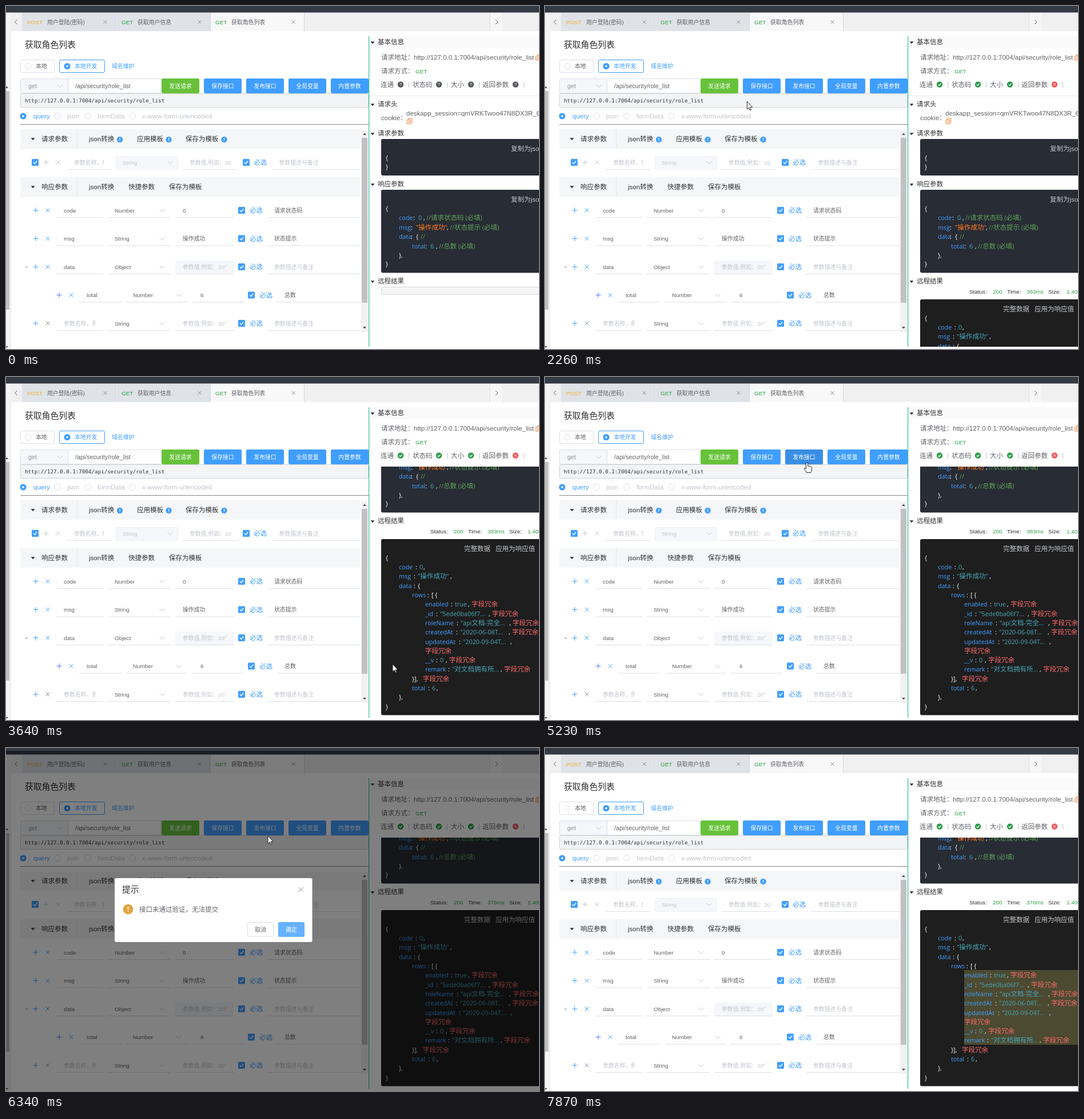
These frames come from a looping animation (932x601 px, 8.05 s). An HTML page:

```html
<!DOCTYPE html>
<html lang="zh-CN">
<head>
<meta charset="utf-8">
<title>接口调试</title>
<style>
html, body { margin: 0; width: 100%; height: 100%; overflow: hidden; background: #fff; }
svg { display: block; }
text { font-family: "Liberation Sans", "Noto Sans CJK SC", "Noto Sans CJK", sans-serif; white-space: pre; }
.code { font-family: "Open Sans", "Noto Sans CJK SC", "Noto Sans CJK", sans-serif; }
.mono { font-family: "DejaVu Sans Mono", monospace; }
.mid { text-anchor: middle; font-weight: 500; }
</style>
</head>
<body>
<svg id="stage" width="932" height="601" viewBox="0 0 932 601"></svg>
<script>
const LOOP = 8050, STEP = 30, S = 9.87, M = 10.7, L = 11.52, H = 14.8;
const BLUE = '#409eff', DARK = '#303133', GREY = '#606266', PALE = '#c0c4cc', EDGE = '#dcdfe6',
      GREEN = '#2c9f45', RED = '#ff6b6b', TEAL = '#46a6b8', NOTE = '#5fa35a', WHITE = '#fff';

// Drawing helpers, each returns markup
const rect = (x, y, w, h, fill, more = '') => `<rect x="${x}" y="${y}" width="${w}" height="${h}" fill="${fill}" ${more}/>`;
const box = (x, y, w, h, fill, stroke, r = 2.5, more = '') =>
  rect(x + .5, y + .5, w - 1, h - 1, fill, `stroke="${stroke}" rx="${r}" ${more}`);
const text = (x, y, s, fill = GREY, size = S, more = '') =>
  `<text x="${x}" y="${y + size * .36}" font-size="${size}" fill="${fill}" ${more}>${s}</text>`;
const line = (d, color, w = 1) => `<path d="${d}" fill="none" stroke="${color}" stroke-width="${w}"/>`;
const shape = (d, fill) => `<path d="${d}" fill="${fill}"/>`;
const disc = (x, y, r, fill, more = '') => `<circle cx="${x}" cy="${y}" r="${r}" fill="${fill}" ${more}/>`;
const rule = (x1, x2, y, color = EDGE) => rect(x1, y, x2 - x1, 1, color);
const cross = (x, y, r, c) => line(`M${x - r} ${y - r}l${2 * r} ${2 * r}m0 ${-2 * r}l${-2 * r} ${2 * r}`, c);
const plus = (x, y, c) => line(`M${x - 4.5} ${y}h9m-4.5 -4.5v9`, c);
const caret = (x, y, r = 3.5, c = DARK) => shape(`M${x - r} ${y - r / 2}h${2 * r}l${-r} ${r + .5}z`, c);
const down = (x, y) => line(`M${x - 4.5} ${y - 2}l4.5 4.5 4.5 -4.5`, PALE);
const clipped = (x, y, w, s) => `<svg x="${x}" y="${y - 10}" width="${w}" height="20">${text(0, 10, s, PALE)}</svg>`;
const group = (id, body, more = '') => `<g id="${id}" ${more}>${body}</g>`;

const radio = (x, y, on) => on
  ? disc(x, y, 5.6, BLUE) + disc(x, y, 1.8, WHITE)
  : disc(x, y, 5.3, WHITE, `stroke="${EDGE}"`);
const check = (x, y) => rect(x - 6, y - 6, 12, 12, BLUE, 'rx="1.5"') + line(`M${x - 3} ${y}l2.3 2.5 4 -5`, WHITE, 1.3);
const info = (x, y) => disc(x, y, 5.2, BLUE) + rect(x - .6, y - 3, 1.2, 3.8, WHITE) + rect(x - .6, y + 1.7, 1.2, 1.3, WHITE);
const copyIcon = (x, y) => line(`M${x - 4.5} ${y - 2}h6.5v7h-6.5zM${x - 2} ${y - 2}v-2.5h6.5v7h-2.5M${x - 3} ${y + .5}h3.5m-3.5 2h3.5`, '#f08a4b');
const button = (x, label, fill, id) =>
  rect(x, 127, 66, 26, fill, `rx="2.5" id="${id}"`) + text(x + 33, 140, label, WHITE, S, `class="mid" id="${id}Label"`);
const section = (y, label) => caret(641, y + 1) + text(650, y, label, DARK, L);
const code = (x, y, s, fill = WHITE) =>
  text(x, y, s.replace(/[\u4e00-\u9fff]+/g, m => `<tspan font-size="${L}">${m}</tspan>`), fill, 10.8, 'class="code"');

function tab(x, verb, color, dx, label, fill) {
  return rect(x, 12, 164, 32, fill) + rect(x + 163, 12, 1, 32, '#d3d7de') + text(x + 8, 28, verb, color) +
    text(x + dx, 28, label) + cross(x + 144.5, 28, 3, '#8a8d93');
}

function head(y, items) {
  return rect(25, y, 595, 34, '#f5f6f7') + rect(124, y, 1, 34, '#e4e7ed') + caret(47, y + 17) +
    items.map(([x, s]) => text(x, y + 17, s, DARK, L)).join('');
}

// One response field; d shifts the row for a nested level
function field(y, name, type, value, note, d = 0) {
  const k = d ? 17 : 0, [nx, tx, vx] = d ? [141, 222, 340] : [101, 190, 309];
  const dim = !name, c = d ? '#5b7cff' : BLUE, u = y + 12;
  return plus(52 + d, y, c) + cross(73 + d, y, 3.3, dim ? '#909399' : BLUE) +
    rule(nx - 13, d ? 202 : 170, u) + rule(tx - 12, d ? 317 : 288, u) +
    (name === 'data' ? rect(296, y - 11, 102, 23, '#f5f7fa') : '') +
    rule(vx - (d ? 15 : 13), d ? 415 : 398, u) + rule(457 + k, 620, u) +
    (dim ? clipped(nx, y, 56, '参数名称，例如') : text(nx, y, name)) +
    text(tx, y, type) + down(d ? 302 : 273, y) +
    (value ? text(vx, y, value) : clipped(vx, y, 77, '参数值,例如：20个')) +
    check(412 + k, y) + text(426 + k, y, '必选', BLUE, L) +
    text((d ? 487 : 469), y, note || '参数描述与备注', note ? GREY : PALE);
}

function leftPane() {
  let s = rect(0, 0, 932, 601, WHITE) + rect(0, 0, 932, 11.5, '#353b45') + rect(0, 12, 8, 589, '#f4f4f5') +
    rect(0, 149, 6, 383, '#c1c1c1') + shape('M0 144h4l-3 -4zM0 596h4l-3 3z', '#505050') + rect(8, 44, 1, 557, '#e8e8ea');
  s += rect(8, 12, 924, 32, '#f0f0f1') + rect(28, 12, 1, 32, '#dfe2e7') +
    line('M19.5 24l-4 4 4 4', GREY) + rect(847, 12, 21, 32, '#f6f6f7') + rect(846, 12, 1, 32, EDGE) + line('M856 24l4 4 -4 4', GREY);
  s += tab(29, 'POST', '#efb02c', 43, '用户登陆(密码)', '#dfe2e7') +
    tab(194, 'GET', GREEN, 36, '获取用户信息', '#dfe2e7') + tab(358, 'GET', GREEN, 36, '获取角色列表', '#f8f8f9');
  s += text(33, 68, '获取角色列表', DARK, H) + box(25, 94, 60, 23, WHITE, EDGE) + box(93, 94, 80, 23, WHITE, BLUE) +
    radio(39, 105.5) + radio(107, 105.5, 1) + text(52, 105.5, '本地') + text(120, 105.5, '本地开发', BLUE) +
    text(185, 105, '域名维护', BLUE);
  s += box(25, 153, 609, 25, '#f3f4f5', '#cfd1d4') +
    text(33, 165.5, 'http://127.0.0.1:7004/api/security/role_list', '#333', 9.22, 'class="mono"');
  s += box(25, 127, 84, 26, '#f5f7fa', EDGE) + text(39, 140, 'get', '#909399', M) + down(94, 140) +
    box(108, 127, 163, 26, WHITE, EDGE, 0) + text(121, 140, '/api/security/role_list', GREY, M);
  s += button(272, '发送请求', '#67c23a', 'send') + button(346, '保存接口', BLUE, 'save') +
    button(420, '发布接口', BLUE, 'publish') + button(494, '全局变量', BLUE, 'vars') + button(568, '内置参数', BLUE, 'preset');
  [[30, 48, 'query'], [90, 107, 'json'], [143, 160, 'formData'], [221, 238, 'x-www-form-urlencoded']]
    .forEach(([cx, tx, label], i) => s += radio(cx, 193, !i) + text(tx, 193, label, i ? PALE : BLUE, L));
  s += rule(25, 634, 207, '#85888e');
  s += head(216, [[62, '请求参数'], [145, 'json转换'], [229, '应用模板'], [314, '保存为模板']]) +
    info(199, 234) + info(284.5, 234) + info(381.5, 234);
  s += check(51, 274) + plus(70, 274, PALE) + cross(91, 274, 3.5, PALE) + rule(106, 184, 286) + clipped(119, 274, 52, '参数名称，例如') +
    box(192, 263, 109, 24, '#f5f7fa', '#edf0f4') + text(204, 274, 'String', PALE) + down(287, 274) +
    rule(309, 405, 286) + clipped(321, 274, 73, '参数值,例如：20') + check(420, 274) + text(433, 274, '必选', BLUE, L) +
    rule(465, 620, 286) + text(477.5, 274, '参数描述与备注', PALE);
  s += head(300, [[62, '响应参数'], [145, 'json转换'], [214, '快捷参数'], [285, '保存为模板']]);
  s += field(358, 'code', 'Number', '0', '请求状态码') + field(407.5, 'msg', 'String', '操作成功', '状态提示') +
    caret(36, 458, 3, PALE) + field(457, 'data', 'Object') + field(506.5, 'total', 'Number', '6', '总数', 41) + field(556, '', 'String');
  return s + rect(621, 218, 12, 353, '#f1f1f1') + rect(622, 231, 10, 289, '#c1c1c1') +
    shape('M624 226h6l-3 -3.5zM624 562h6l-3 3.5z', '#505050') + rect(634, 53, 1.2, 544, '#2fbf97');
}

const checks = [690, 757, 813, 891];
function rightHead() {
  return rect(636, 45, 296, 112, WHITE) + rect(636, 53, 296, 21, '#fafafb') + section(63, '基本信息') +
    text(656, 90, '请求地址：', GREY, L) + text(713, 90, 'http://127.0.0.1:7004/api/security/role_list', GREY, L) + copyIcon(931, 90) +
    text(656, 114, '请求方式：', GREY, L) + text(716, 114, 'GET', GREEN) +
    [[655, '连通'], [711, '状态码'], [778, '大小'], [833, '返回参数']].map(([x, s]) => text(x, 138, s, GREY, L)).join('') +
    [704, 771, 827, 905].map(x => rect(x, 133, 1, 10, '#c4c6ca')).join('') +
    group('asked', checks.map(x => disc(x, 137.5, 5.2, '#55585e') + text(x, 137.5, '?', WHITE, 8, 'class="mid"')).join('')) +
    group('judged', checks.map((x, i) => disc(x, 137.5, 5.2, i < 3 ? '#2a9d48' : '#f05c5c') +
      (i < 3 ? line(`M${x - 2.5} 137.5l2 2 3 -3.5`, WHITE, 1.2) : cross(x, 137.5, 1.8, WHITE))).join(''));
}

function sample() {
  const rows = [[371, 687, 'code', 721, '0', TEAL, 735, '//请求状态码 (必填)'],
    [388, 687, 'msg', 717, '"操作成功"', '#ff7a22', 776, '//状态提示 (必填)'],
    [404.5, 687, 'data', 717, '{', WHITE, 725, '//'], [421, 710, 'total', 742, '6', TEAL, 757, '//总数 (必填)']];
  return rows.map(([y, x, key, vx, v, c, nx, note]) => code(x, y, key, BLUE) + code(vx - 9, y, ':') + code(vx, y, v, c) +
    (v === '{' ? '' : code(nx - 5, y, ',')) + code(nx, y, note, NOTE)).join('') +
    code(664, 355, '{') + code(687, 437, '},') + code(664, 452, '}');
}

function result() {
  const at = i => 547 + 16.3 * i;
  const rows = [[1, 687, 'code', 723, '0', 736], [2, 687, 'msg', 720, '"操作成功"', 783], [3, 687, 'data', 720, '{'], [4, 710, 'rows', 744, '[ {'],
    [5, 733, 'enabled', 785, 'true', 814, 1], [6, 733, '_id', 759, '"5ede0ba06f7...', 850, 1],
    [7, 733, 'roleName', 795, '"api文档-完全...', 886, 1], [8, 733, 'createdAt', 794, '"2020-06-08T...', 885, 1],
    [9, 733, 'updatedAt', 799, '"2020-09-04T...', 888], [11, 733, '__v', 759, '0', 775, 1],
    [12, 733, 'remark', 780, '"对文档拥有所...', 871, 1], [14, 710, 'total', 745, '6', 759]];
  const extra = (x, i) => code(x, at(i), '字段冗余', RED);
  return text(742, 500, 'Status:', DARK) + text(783, 500, '200', GREEN) + text(808, 500, 'Time:', DARK) +
    text(842, 500, '383ms', GREEN, S, 'id="cost"') + text(880, 500, 'Size:', DARK) + text(912, 500, '1.40kb', GREEN) +
    rect(656, 514, 290, 308.5, '#1e1e1e', 'rx="3"') + rect(733, 619, 199, 131, '#4c4a31', 'id="glow"') +
    text(801, 531, '完整数据', '#c3c6cb', L) + text(856, 531, '应用为响应值', '#c3c6cb', L) +
    rows.map(([i, x, key, vx, v, end, bad]) => code(x, at(i), key, BLUE) + code(vx - 7, at(i), ':') +
      code(vx, at(i), v, /[{]/.test(v) ? WHITE : TEAL) + (end ? code(end - 6, at(i), ',') : '') + (bad ? extra(end, i) : '')).join('') +
    extra(733, 10) + code(664, at(0), '{') + code(710, at(13), '}],') + extra(729, 13) + code(687, at(15), '},') + code(664, at(16), '}');
}

function scrollPane() {
  const panel = (y, h) => rect(656, y, 290, h, '#282c34', 'rx="3"') + text(883, y + 17, '复制为json', '#bfc2c8', L);
  return rule(636, 932, 157, '#e6e8eb') + section(172, '请求头') + text(656, 196, 'cookie：', GREY, L) +
    text(700, 188, 'deskapp_session=qmVRKTwoo47N8DX3R_6vT2', GREY, L) + copyIcon(705.5, 201.5) +
    section(223, '请求参数') + panel(233, 64) + code(664, 266, '{') + code(664, 282, '}') +
    section(312, '响应参数') + panel(322, 145.5) + sample() + section(482, '远程结果') +
    box(656, 492, 290, 14, '#f5f5f5', '#d8d8d8', 3, 'id="empty"') + group('result', result()) +
    group('loading', rect(656, 514, 290, 308.5, WHITE, 'opacity=".9" id="veil"') +
      `<circle id="spin" r="13.8" pathLength="125.6" fill="none" stroke="${BLUE}" stroke-width="1.5" stroke-linecap="round"/>` +
      text(805, 529, '大部分情况下你可以使用鼠标右键进行快捷操作', BLUE, L, 'text-anchor="middle" id="hintA"') +
      group('hintB', text(659, 700, '按住ctrl+F5可以强制刷新浏览器，这样您就不用手动清', BLUE, L) + text(775, 715, '空缓存了', BLUE, L)));
}

const tip = (id, x, y, w, h, arrow, tx, s) => group(id, rect(x, y, w, h, '#f2f2f2', 'rx="3"') +
  shape(`M${arrow - 5} ${y + h}h10l-5 5z`, '#f2f2f2') + text(tx, y + h / 2, s, GREY));

const dialog = () => rect(190, 228, 345.5, 112, WHITE, 'rx="3"') + text(203, 248, '提示', DARK, H) + cross(515.5, 248, 4, '#909399') +
  disc(213.5, 282.5, 8.8, '#e6a23c') + rect(212.6, 277.5, 1.8, 6.2, WHITE) + rect(212.6, 285.2, 1.8, 1.9, WHITE) +
  text(233, 282.5, '接口未通过验证，无法提交', GREY, L) + box(422, 305, 46, 26, WHITE, EDGE) + text(445, 318, '取消', GREY, S, 'class="mid"') +
  rect(476, 305, 46, 26, '#66b1ff', 'rx="2.5" id="ok"') + text(499, 318, '确定', WHITE, S, 'class="mid"');

const pointer = (id, d) => `<path id="${id}" d="${d}" fill="#fff" stroke="#111" stroke-width=".9" stroke-linejoin="round"/>`;

stage.innerHTML = leftPane() +
  `<svg x="636" y="157" width="296" height="440" viewBox="636 157 296 440">${group('scroller', scrollPane())}</svg>` + rightHead() +
  tip('tipA', 760, 463, 152, 27, 800, 788, '"2020-09-04T08:15:20"') +
  tip('tipB', 674, 463, 266, 34, 807, 684, '对文档拥有所有权限，可以新增、查看和修改全部接口') +
  rect(0, 5, 932, 596, '#000', 'id="shade"') + group('dialog', dialog()) +
  group('cursor', pointer('arrow', 'M0 0V13.5L3.1 10.6 5.1 15.3 7 14.5 5 9.9H9.2Z') +
    pointer('hand', 'M-1.6 .8Q0 -.8 1.6 .8V6.2Q3 5.4 4 6.6Q5.4 6 6.3 7.2Q8 6.8 8.4 8.6V12Q8.2 15 6.8 17.5H-.6Q-2 14.5 -4.6 11.2Q-4.8 9.2 -3 9.6L-1.6 11Z') +
    `<path id="beam" d="M-2.5 -6.5H2.5M0 -6.5V6.5M-2.5 6.5H2.5" fill="none" stroke="#a0a0a0"/>`);

const $ = id => document.getElementById(id);
const set = (id, name, v) => $(id).setAttribute(name, v);
const fade = (id, v) => set(id, 'opacity', v);
const show = (id, on) => set(id, 'visibility', on ? 'visible' : 'hidden');
const part = (t, a, b) => Math.min(1, Math.max(0, (t - a) / (b - a)));

function bezier(x1, y1, x2, y2) {
  const f = (a, b, u) => 3 * a * u * (1 - u) ** 2 + 3 * b * u * u * (1 - u) + u ** 3;
  return x => {
    let lo = 0, hi = 1;
    for (let i = 0; i < 24; i++) {
      const u = (lo + hi) / 2;
      if (f(x1, x2, u) < x) lo = u; else hi = u;
    }
    return f(y1, y2, lo);
  };
}
const ease = bezier(.25, .1, .25, 1), inOut = bezier(.42, 0, .58, 1);
const pulse = (t, a, b, c, d) => ease(part(t, a, b)) * (1 - ease(part(t, c, d)));

// Pointer route: time, x, y
const route = [[100, 928, 31], [850, 307, 139], [2200, 307, 139], [2480, 800, 440], [2650, 797, 522], [2800, 800, 512],
  [2980, 684, 506], [3640, 676, 503], [3790, 676, 503], [4570, 458, 150], [6310, 458, 150], [6340, 458, 154],
  [6800, 500, 341], [7120, 498, 320], [7300, 498, 320], [7600, 867, 498]];
function locate(t) {
  let i = 0;
  while (i < route.length - 2 && t > route[i + 1][0]) i++;
  const [a, x, y] = route[i], [b, p, q] = route[i + 1], k = inOut(part(t, a, b));
  return [x + (p - x) * k, y + (q - y) * k];
}

const OPEN = 5675, CLOSE = 7300;
function render(t) {
  const [x, y] = locate(t);
  const over = (l, u, w, h) => x >= l && x < l + w && y >= u && y < u + h;
  const within = (a, b) => t >= a && t < b;
  const done = t >= 1600, modal = within(OPEN, CLOSE);

  const scroll = Math.round(230 * (1 - (1 - part(t, 2420, 2760)) ** 2.5));
  set('scroller', 'transform', `translate(0 ${-scroll})`);
  show('result', done);
  show('empty', !done);
  show('asked', !done);
  show('judged', done);
  $('cost').textContent = t < OPEN ? '383ms' : '376ms';

  // Loading veil and spinner
  const again = t > 4000;
  fade('loading', again ? pulse(t, 5260, 5560, OPEN, OPEN + 300) : pulse(t, 1300, 1450, 1600, 1900));
  set('veil', 'y', done ? 514 : 492);
  set('veil', 'height', done ? 308.5 : 14);
  show('hintA', !done);
  show('hintB', again);
  show('spin', again || !done);
  const spun = Math.max(0, t - (again ? 5260 : 1210)), k = inOut(part(spun, 0, 750));
  set('spin', 'stroke-dasharray', `${1 + 89 * k} 200`);
  set('spin', 'stroke-dashoffset', -40 * k);
  set('spin', 'transform', `translate(${again ? '798 668' : '805 499'}) rotate(${spun * .18})`);

  // Buttons
  const sending = within(1300, 1600) || within(5300, OPEN);
  const onSend = t > 100 && over(272, 127, 66, 26), onPublish = over(420, 127, 66, 26) && t < OPEN && t > 4000;
  $('sendLabel').textContent = sending ? '取消请求' : '发送请求';
  set('send', 'fill', sending ? (onSend ? '#f78989' : '#f56c6c') : within(1030, 1090) ? '#5daf34' : onSend && t < 2200 ? '#85ce61' : '#67c23a');
  set('publish', 'fill', within(5230, 5320) ? '#3a8ee6' : onPublish ? '#66b1ff' : BLUE);
  set('ok', 'fill', within(7240, CLOSE) ? '#3a8ee6' : '#66b1ff');

  // Dialog
  const shown = pulse(t, OPEN, OPEN + 300, CLOSE, CLOSE + 300);
  fade('shade', .5 * pulse(t, OPEN, OPEN + 200, CLOSE, CLOSE + 200));
  fade('dialog', shown);
  set('dialog', 'transform', `translate(0 ${-16.5 * (1 - shown)})`);

  // Pointer and what it hovers
  const reading = done && !modal && x > 733 && y > 619 - scroll && y < 750 - scroll;
  const pressing = onSend || onPublish || (modal && over(476, 305, 46, 26));
  show('glow', reading);
  fade('tipA', .24 * pulse(t, 2540, 2640, 2660, 2750));
  fade('tipB', pulse(t, 2770, 2900, 3010, 3310));
  set('cursor', 'transform', `translate(${x} ${y})`);
  const live = within(100, 7870);
  show('beam', live && reading);
  show('hand', live && !reading && pressing);
  show('arrow', live && !reading && !pressing);
}

const start = performance.now();
function tick() {
  const t = (performance.now() - start) % LOOP;
  render(100 + Math.floor((t - 100) / STEP) * STEP);
  requestAnimationFrame(tick);
}
tick();
</script>
</body>
</html>
```
